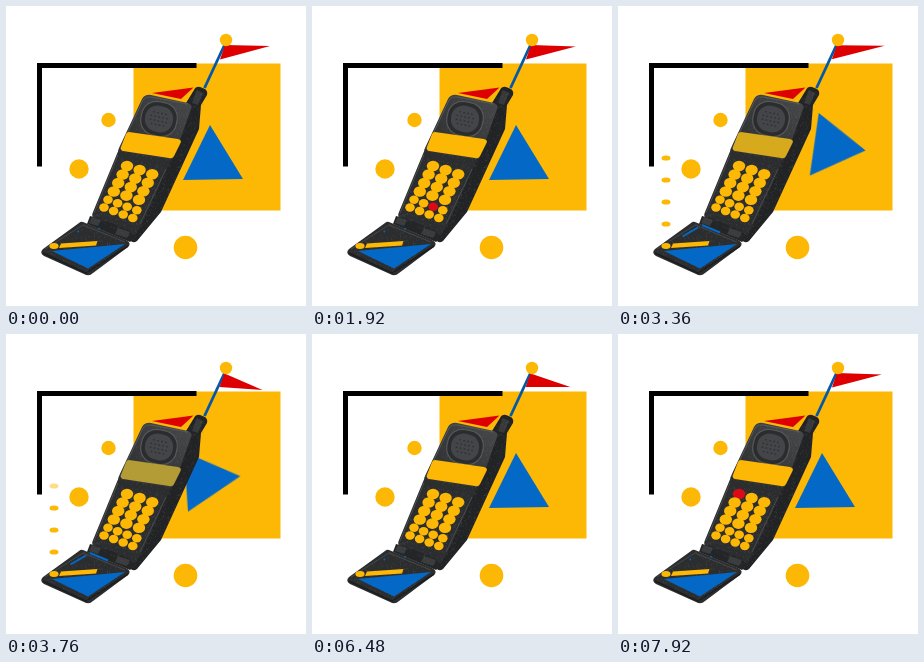
Write an HTML page that moves like this. It is 300 px wide and 300 px high and loops after 8 s.

```html
<!DOCTYPE html>
<html lang="en">
<head>
<meta charset="utf-8">
<title>Flip phone</title>
<style>
  html, body { margin: 0; width: 100%; height: 100%; overflow: hidden; background: #fff; }
  svg { display: block; width: 100vw; height: 100vh; }
  .yellow { fill: #fcb804; }
  .blue { fill: #0469c6; }
  .red { fill: #de0000; }
  .key { fill: #fcb804; }
  .pressed { animation: press 3.84s step-end infinite; }
  @keyframes press { 0% { fill: #dc0a14; } 3.125%, 100% { fill: #fcb804; } }

  #flag { animation: wave 1s ease-in-out infinite; }
  @keyframes wave {
    0%, 100% { d: path("M219 39 L264 40 L214 53.5Z"); animation-timing-function: ease-out; }
    24% { d: path("M219 39 L271 33 L214 53.5Z"); }
    56%, 78% { d: path("M218.5 39.5 L256.5 56 L213.5 53Z"); }
    94% { d: path("M219 39 L264 40 L214 53.5Z"); }
  }

  #spinner { transform-origin: 207px 146.5px; animation: spin 3.84s 2.88s infinite; }
  @keyframes spin {
    0% { transform: rotate(0deg); animation-timing-function: cubic-bezier(.1, 0, .9, 1); }
    31.25%, 100% { transform: rotate(-360deg); }
  }
</style>
</head>
<body>
<svg viewBox="0 0 300 300" xmlns="http://www.w3.org/2000/svg">
  <defs>
    <linearGradient id="shell" x1="0" y1="1" x2="1" y2="0">
      <stop offset="0" stop-color="#292a2c"/>
      <stop offset="1" stop-color="#48494b"/>
    </linearGradient>
    <clipPath id="body">
      <path d="M143 90 L180 98 L190 84 L200 89 L193 123 L155 206 L129 235 L86 211 L111 148 L115 140Z M77 217 L122 237 L83 268 L38 246Z"/>
    </clipPath>
  </defs>

  <path class="yellow" d="M127.5 57.5H274.5V204.5H127.5Z"/>
  <path d="M33.5 160.5V59.5H190.5" fill="none" stroke="#000" stroke-width="5"/>
  <circle class="yellow" cx="102.5" cy="114" r="7.2"/>
  <circle class="yellow" cx="73" cy="163" r="9.7"/>
  <circle class="yellow" cx="179.5" cy="241.5" r="11.8"/>
  <path id="spinner" class="blue" d="M204 119 L237 173 L177 174Z"/>

  <path d="M198.5 82 L218.5 39" stroke="#0458a8" stroke-width="2.8"/>
  <path id="flag" class="red" d="M219 39 L264 40 L214 53.5Z"/>
  <circle class="yellow" cx="220" cy="34" r="6.2"/>
  <path class="red" d="M146 87 L187.5 81.5 L175 93Z"/>

  <g stroke-linejoin="round">
    <!-- side and antenna base -->
    <path d="M180 97 L188 84 Q190 80 194 81 L199 83 Q202 85 201 89 L195 99 L193 123 L155 206 L131 235 Q127 238 124 234 L126 215 L165 150Z" fill="#222325"/>
    <path d="M191 84 L197 87 L192 99 L186 97Z" fill="#38393b"/>
    <!-- keypad section -->
    <path d="M113 143 L166 152 L157 172 L134 222 L126 233 L88 213 Q85 210 87 206Z" fill="#2c2d2f"/>
    <path d="M112 149 L88 207 M160 163 L134 218" fill="none" stroke="#4a4c4e" stroke-width=".9"/>
    <!-- head -->
    <path d="M145 89 L182 97 Q187 99 185 103 L168 151 Q167 154 163 153 L116 147 Q111 146 113 142 L136 93 Q139 88 145 89Z" fill="url(#shell)"/>
    <path d="M114 143 L137 94 Q140 90 145 91 L182 98" fill="none" stroke="#5b5d60" stroke-width=".8"/>
    <!-- hinge -->
    <path d="M84 210 L95 213 L122 224 L130 231 L124 236 L81 218Z" fill="#242527"/>
    <path d="M86 211 L95 214 L92 220 L83 217Z M112 222 L124 226 L121 232 L109 228Z" fill="#3a3c3e"/>
    <!-- flip panel -->
    <path d="M77 216 L120 234 Q126 237 122 241 L87 267 Q83 271 78 268 L38 250 Q33 247 37 243 L73 217 Q75 215 77 216Z" fill="#2c2d2f"/>
    <path d="M39 243 L77 219 L119 236" fill="none" stroke="#4a4c4e" stroke-width=".8"/>
    <path d="M37 247 L80 267 L122 240" fill="none" stroke="#1c1d1f" stroke-width="1.6"/>
  </g>
  <path id="grain" clip-path="url(#body)" stroke="#77797c" stroke-width=".7" opacity=".4"/>

  <g transform="rotate(12 153 113)">
    <rect x="135" y="96" width="36" height="34" rx="15" fill="#2b2c2e" stroke="#56585b" stroke-width="1.2"/>
    <rect x="139" y="100" width="28" height="26" rx="12" fill="#434548"/>
    <path d="M146 107h14M144 111h18M144 115h18M146 119h14" stroke="#2b2c2e" stroke-width="1.2" stroke-dasharray="1.5 2.500"/>
  </g>
  <path id="screen" class="yellow" d="M123 126 L172 133 Q176 134 174.5 137 L168 150 Q166.5 153 163 152 L117 145 Q114 144 115 141 L120 128 Q121 126 123 126Z"/>
  <g id="keys"></g>

  <path class="yellow" d="M55 237.5 L91.5 235 L90 239.5 L53 242Z"/>
  <path class="blue" d="M46 245 L119 238 L82 262.5Z"/>
  <ellipse class="yellow" cx="48" cy="240" rx="4.6" ry="2.9"/>
  <g class="blue">
    <circle cx="72.3" cy="225.5" r=".9"/>
    <circle cx="93" cy="222.7" r=".9"/>
  </g>
  <g stroke="#0469c6" stroke-width="2">
    <path class="line" d="M64.500 230.500 L80 221.500" style="transform-origin:72.300px 226px"/>
    <path class="line" d="M84 219 L102 226.500" style="transform-origin:93px 222.700px"/>
  </g>
  <g id="drops"></g>
</svg>
<script>
  const LENGTH = 8000;
  const CALL = { duration: 3840, delay: 2640, iterations: Infinity, fill: 'backwards' };
  const byId = id => document.getElementById(id);

  function ellipse(parent, className, cx, cy, rx, ry) {
    const el = document.createElementNS('http://www.w3.org/2000/svg', 'ellipse');
    el.setAttribute('class', className);
    Object.entries({ cx, cy, rx, ry }).forEach(([name, value]) => el.setAttribute(name, value));
    parent.append(el);
    return el;
  }

  // Each stop is [milliseconds since the call began, value].
  function onCall(el, property, stops) {
    const frames = stops.map(([ms, value]) => ({ offset: ms / CALL.duration, [property]: value }));
    el.animate(frames, CALL);
  }

  // Four rows of large keys, then two rows of small ones.
  const keys = [];
  for (let row = 0; row < 4; row++) {
    for (let col = 0; col < 3; col++) {
      keys.push(ellipse(byId('keys'), 'key',
        121 - 4.4 * row + 12.6 * col, 160 + 8.5 * row + 4.1 * col, 6.2, 5.3));
    }
  }
  for (let row = 0; row < 2; row++) {
    for (let col = 0; col < 4; col++) {
      keys.push(ellipse(byId('keys'), 'key',
        102 - 4 * row + 9.6 * col, 193.7 + 7.8 * row + 3.5 * col, 4.8, 4.2));
    }
  }

  // Dial seven keys, one every 280 ms.
  [0, 5, 7, 9, 2, 11, 14].forEach((key, i) => {
    keys[key].classList.add('pressed');
    keys[key].style.animationDelay = `${200 + 280 * i}ms`;
  });

  for (let i = 0; i < 4; i++) {
    const drop = ellipse(byId('drops'), 'yellow', 48, 218 - 22 * i, 4.5, 2.6);
    const appear = 245 + 28 * i;
    const leave = 1100 + 40 * (3 - i);
    onCall(drop, 'opacity', [[0, 0], [appear, 0], [appear + 30, 1],
      [leave, 1], [leave + 40, 0], [CALL.duration, 0]]);
  }

  document.querySelectorAll('.line').forEach(line => onCall(line, 'transform', [
    [0, 'scale(0)'], [80, 'scale(0)'], [220, 'scale(1)'],
    [1200, 'scale(1)'], [1270, 'scale(0)'], [CALL.duration, 'scale(0)']
  ]));

  const lit = '#fcb804', dim = '#b39b36';
  const flashes = [480, 800, 1120].flatMap(ms =>
    [[ms - 140, lit], [ms - 20, dim], [ms + 20, dim], [ms + 140, lit]]);
  onCall(byId('screen'), 'fill', [[0, lit], ...flashes, [CALL.duration, lit]]);

  // Seeded speckles on the casing.
  let seed = 7;
  const random = () => (seed = seed * 16807 % 2147483647) / 2147483647;
  let speckles = '';
  for (let i = 0; i < 3600; i++) {
    speckles += `M${(36 + 166 * random()).toFixed(1)} ${(82 + 188 * random()).toFixed(1)}h.7`;
  }
  byId('grain').setAttribute('d', speckles);

  // One shared clock restarts every part together.
  const parts = document.getAnimations();
  parts.forEach(part => part.pause());
  function tick() {
    const time = performance.now() % LENGTH;
    parts.forEach(part => { part.currentTime = time; });
    requestAnimationFrame(tick);
  }
  tick();
</script>
</body>
</html>
```
